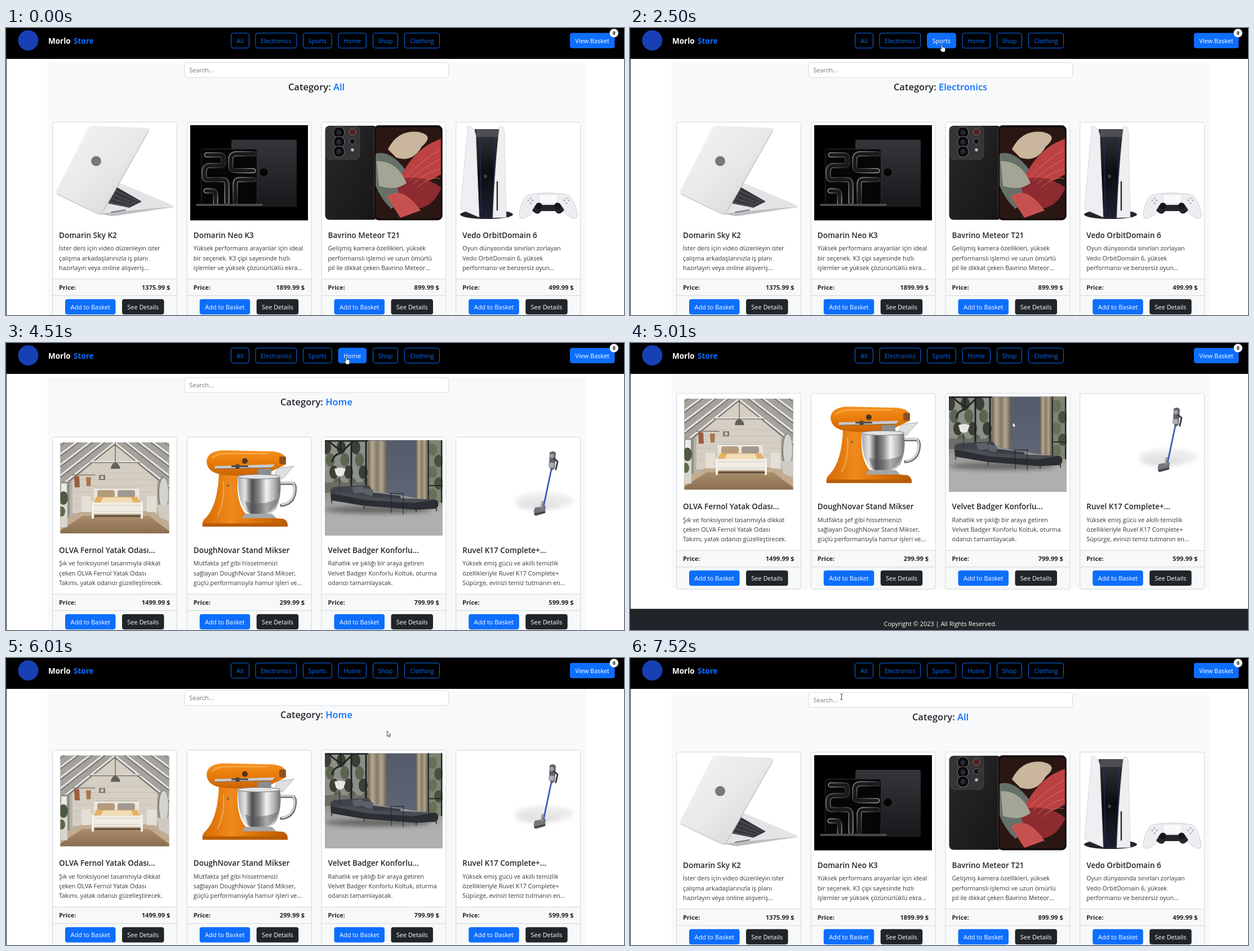
An HTML page that plays this animation: 1097 px wide and 511 px high, repeating every 8000 ms.

```html
<!DOCTYPE html>
<html lang="tr">
<head>
<meta charset="utf-8">
<title>Shop</title>
<style>
html, body { margin: 0; width: 100%; height: 100%; overflow: hidden; background: #fff; }
svg { display: block; width: 100%; height: 100%; }
text { font: 10.95px "Open Sans", "Noto Sans", sans-serif; fill: #212529; white-space: pre; }
.mid { text-anchor: middle; }
.end { text-anchor: end; }
.head { font-size: 16.5px; font-weight: 600; }
.name { font-size: 13.5px; font-weight: 600; }
.desc { font-size: 10.8px; fill: #33373b; }
.bold { font-weight: 700; }
.sum { font-size: 11.2px; font-weight: 700; }
.brand { font-size: 13.5px; font-weight: 700; }
.badge { font-size: 8.2px; font-weight: 700; }
</style>
</head>
<body>
<svg id="stage" viewBox="0 0 1097 511" preserveAspectRatio="none"></svg>
<script>
const BLUE = '#0d6efd', DARK = '#212529';

// Shape helpers
const rect = (x, y, w, h, fill, rx = 0, more = '') =>
  `<rect x="${x}" y="${y}" width="${w}" height="${h}" rx="${rx}" fill="${fill}" ${more}/>`;
const oval = (x, y, rx, ry, fill, more = '') =>
  `<ellipse cx="${x}" cy="${y}" rx="${rx}" ry="${ry}" fill="${fill}" ${more}/>`;
const dot = (x, y, r, fill, more) => oval(x, y, r, r, fill, more);
const path = (d, fill, more = '') => `<path d="${d}" fill="${fill}" ${more}/>`;
const line = (d, stroke, w = 1, more = '') =>
  `<path d="${d}" fill="none" stroke="${stroke}" stroke-width="${w}" stroke-linecap="round" stroke-linejoin="round" ${more}/>`;
const text = (x, y, s, cls = '', fill = '') =>
  `<text x="${x}" y="${y}" class="${cls}"${fill && ` style="fill:${fill}"`}>${s}</text>`;
const grad = (id, stops, x2 = 0, y2 = 1) =>
  `<linearGradient id="${id}" x2="${x2}" y2="${y2}">` + stops.map((c, i) =>
    `<stop offset="${i / (stops.length - 1)}" stop-color="${c}"/>`).join('') + '</linearGradient>';
const repeat = (n, f) => Array.from({ length: n }, (_, i) => f(i)).join('');
const blur = 'filter="url(#soft)"';

const defs = '<defs>' +
  grad('lid', ['#f4f4f4', '#e9e9ea', '#d0d1d3'], 1, 1) +
  grad('slate', ['#35353b', '#18181b']) +
  grad('tube', ['#9a9a9f', '#2c2c30', '#a2a2a7'], 1, 1) +
  grad('back', ['#2b2829', '#171516'], 1, 1) +
  grad('core', ['#34363d', '#0c0d12', '#1b2030']) +
  grad('street', ['#9a9ea3', '#73777c', '#5f656b', '#777c83']) +
  grad('knit', ['#10151f', '#12325f', '#1b5fae', '#15468c'], 1, 0) +
  grad('orange', ['#f59222', '#e87a08', '#c86203']) +
  grad('column', ['#d56a04', '#f08a1c', '#d87006', '#b95a02'], 1, 0) +
  grad('steel', ['#a9aaac', '#e4e4e4', '#4f4f52', '#8b8b8e', '#f2f2f2', '#b9babc', '#6d6e71'], 1, 0) +
  grad('wall', ['#565b6c', '#666b7c']) +
  grad('floor', ['#8d8c8a', '#b1b0ae', '#a3a2a0']) +
  grad('drape', ['#6f6654', '#b5aa94', '#837a67', '#b0a58f', '#6d6453'], 1, 0) +
  grad('rug', ['#a98c6b', '#8a6e50']) +
  '<filter id="soft" x="-30%" y="-50%" width="160%" height="200%"><feGaussianBlur stdDeviation="4"/></filter>' +
  '<clipPath id="screen"><rect x="656" y="177" width="116" height="162" rx="6"/></clipPath>' +
  '<clipPath id="road"><rect x="446.5" y="173" width="209" height="169.5"/></clipPath>' +
  '<clipPath id="lounge"><rect x="566" y="173" width="209" height="169.5"/></clipPath>' +
  '<clipPath id="attic"><rect x="96.5" y="177" width="193" height="162"/></clipPath>' +
  '</defs>';

// Product pictures, in page coordinates
const art = {
  lightLaptop: () =>
    path('M200 275L297 316V320L190 335L163 331Z', '#e3e4e5') +
    path('M297 318L190 335L166 331L190 328Z', '#bcbdc0') +
    path('M196 283L241 309L219 320L180 312Z', '#36373b') +
    repeat(4, i => line(`M${193 - i * 4} ${289 + i * 7}L${235 - i * 5} ${309 + i * 3}`, '#85868a', .6)) +
    path('M153 174L250 178Q256 179 253 185L172 328Q168 334 161 330L91 296Q87 293 90 288L146 178Q148 174 153 174Z', 'url(#lid)') +
    line('M253 184L171 329Q168 333 161 330L91 296', '#b8babc', 1.2) +
    line('M187 328L212 324', '#77787b', 1.8) +
    dot(160, 237, 9, '#77797c'),
  darkLaptop: () =>
    rect(327, 173, 209, 169.5, '#000') +
    rect(400, 199, 116, 119, 'url(#slate)', 4) +
    rect(346.5, 215.5, 99, 99, '#060607', 4, 'stroke="#303034"') +
    ['M356 226H380Q386 226 386 232V239Q386 245 380 245H362Q352 245 352 255V264Q352 270 358 270H385Q392 270 392 279V310',
      'M440 224H409Q399 224 399 234V248Q399 254 407 254H439', 'M440 270H414Q407 270 407 278V310',
      'M355 290H365Q372 290 372 297V311'].map(d => line(d, 'url(#tube)', 9) + line(d, '#1a1a1d', 6)).join('') +
    rect(337, 313, 119, 4, '#48484d', 2) + rect(456, 315, 60, 3, '#1f1f22', 1) +
    dot(457.5, 257, 7, '#050506'),
  phone: () =>
    rect(566.5, 174, 93, 167.5, 'url(#back)', 8) +
    rect(568, 175, 60, 59, '#363437', 7, 'stroke="#504c4e" stroke-width=".7"') +
    [186, 203, 220].map(y => dot(591, y, 10, '#0b0b0c', 'stroke="#777"') + dot(591, y, 4.5, '#262b38')).join('') +
    dot(615, 185, 6, '#50211f', 'stroke="#777"') + dot(615, 202, 5, '#111', 'stroke="#777"') + dot(615, 217, 2.8, '#c2bda9') +
    rect(653.5, 173.5, 121, 168.5, '#0b0808', 8, 'stroke="#48403d"') +
    '<g clip-path="url(#screen)">' + rect(656, 177, 116, 162, '#2a1714') +
    path('M656 224Q682 216 710 254Q721 298 684 322Q665 304 656 280Z', '#657069') +
    path('M678 216Q695 181 732 185Q762 191 738 211Q722 240 693 231Z', '#cab69c') +
    path('M774 197Q727 211 701 264Q720 292 775 259Z', '#bc4143') +
    path('M690 272Q738 256 773 285Q751 333 706 318Z', '#8c2b30') +
    path('M658 237Q694 236 711 276Q692 291 662 281Z', '#a4a596') +
    path('M676 300Q704 279 736 325L700 338Z', '#c65250') +
    repeat(4, i => line(`M${710 + i * 7} ${265 + i * 6}Q${730 + i * 8} ${242 + i * 7} 770 ${217 + i * 17}`, '#df8c7c', .7)) +
    '</g>' + dot(714, 181, 1.5, '#050505'),
  console: () =>
    oval(853, 332, 47, 8, '#23242a') +
    path('M832 180H878L873 336H837Z', 'url(#core)') +
    rect(835, 180, 41, 14, '#4c4e54') +
    line('M841 195L844 330M868 195L865 328', '#25365c', 1) +
    path('M820 174Q831 178 834 190L840 337L810 324Q806 322 807 317Z', '#eeeff1', 'stroke="#c8cacf" stroke-width=".7"') +
    path('M876 176L882 176Q886 182 885 208L888 337L864 338Q868 240 876 176Z', '#eeeff1', 'stroke="#c8cacf" stroke-width=".7"') +
    line('M872 274V324', '#2a2b30', 2.4) + dot(851, 264, 3, '#3b4051') +
    path('M927 297Q962 290 998 297Q1008 304 1014 330Q1015 341 1006 339Q995 334 988 325H937Q930 335 919 339Q910 341 911 329Q917 302 927 297Z', '#eceef1', 'stroke="#c1c4ca" stroke-width=".8"') +
    path('M940 315H985L991 324Q981 336 975 326H950Q944 336 934 325Z', '#24262c') +
    path('M944 296H981L977 313H948Z', '#f9f9fa', 'stroke="#ccced2" stroke-width=".7"') +
    dot(946, 317, 6, '#15161a') + dot(979, 317, 6, '#15161a') +
    [931, 995].map(x => [[-4, 0], [4, 0], [0, -4], [0, 5]].map(([a, b]) => dot(x + a, 307 + b, 1.8, '#b5b9c0')).join('')).join(''),
  whiteShoe: () =>
    rect(208, 173, 209, 169.5, '#f4f4f4') +
    oval(365, 244, 4, 9, 'none', 'stroke="#7a747d" stroke-width="1.3"') +
    path('M238 283Q260 276 282 252Q295 237 304 242Q314 254 330 249L348 246Q361 244 362 253Q364 264 375 276L386 292L325 299L238 297Z', '#fcfcfd', 'stroke="#d9dade" stroke-width=".7"') +
    path('M316 286Q340 269 373 271Q388 284 387 301Q354 306 316 302Z', '#393b44') +
    path('M236 286L318 294L325 301Q266 304 239 298Z', '#fff', 'stroke="#cfd1d5" stroke-width=".6"') +
    line('M239 299Q275 305 318 302', '#34363d', 1.4) + line('M331 291Q350 282 373 289', '#777a84', 2) +
    line('M323 277Q337 265 347 249M300 251L316 271', '#dec4e1', 1.8) +
    repeat(4, i => line(`M${286 + i * 6} ${261 - i * 3}l8 5`, '#d6d6df', 1)) + dot(272, 284, 4, '#303136'),
  streetShoe: () =>
    '<g clip-path="url(#road)">' + rect(446.5, 173, 209, 169.5, 'url(#street)') +
    `<g ${blur}>` + rect(440, 170, 100, 53, '#b3b5b6') + rect(540, 169, 52, 57, '#777777') +
    rect(445, 183, 34, 49, '#6f6766') + rect(486, 185, 28, 32, '#4f5961') + rect(526, 213, 65, 18, '#343d45') +
    rect(598, 167, 28, 76, '#34393e') + rect(628, 173, 35, 105, '#888a8b') + rect(580, 238, 64, 43, '#565c62') +
    dot(548, 194, 11, '#ac8751') + dot(564, 182, 9, '#9a7d54') +
    rect(440, 240, 220, 25, '#83878a') + rect(440, 305, 220, 16, '#8b9098') + '</g>' +
    oval(549, 291, 83, 5, '#333a43', blur) +
    path('M470 244Q473 224 484 227Q499 239 512 237Q525 228 535 226L570 249Q606 253 629 264Q636 274 626 283L488 288Q468 276 470 244Z', '#dedede') +
    path('M468 264Q495 282 540 278L633 271Q632 288 604 290L493 291Q470 285 468 264Z', '#f4f4f3') +
    line('M492 290L604 290Q624 288 631 280', '#555b62', 1.2) +
    line('M512 237Q521 250 550 263M535 227Q547 244 574 254', '#b2b4b6', 1.4) +
    repeat(4, i => line(`M${524 + i * 8} ${239 + i * 4}l8 -6`, '#f5f5f5', 1.4)) +
    dot(555, 265, 6, '#999da1') + '</g>',
  blueShoe: () =>
    path('M694 240Q703 230 716 235Q738 243 752 226Q761 214 774 219L805 238Q838 250 879 253Q893 261 889 272L702 284Q687 271 694 240Z', 'url(#knit)') +
    path('M692 270Q755 281 816 272L889 264Q889 282 861 289L720 294Q690 292 692 270Z', '#e5e8ea') +
    path('M724 276Q794 276 829 269L854 274Q804 290 737 288Z', '#3b9be0') +
    line('M691 289Q717 295 747 291M766 293L834 292Q874 290 888 278', '#e7752e', 2.2) +
    line('M718 239Q743 246 759 231', '#f1b17b', 1) +
    repeat(6, i => line(`M${767 + i * 9} ${231 + i * 3}l13 -6`, '#091729', 2)) +
    line('M704 253Q737 257 755 269M841 253Q862 257 878 267', '#2f75bd', 1) + dot(814, 260, 9, '#827c7a'),
  bedroom: () =>
    '<g clip-path="url(#attic)">' + rect(96, 177, 194, 162, '#b7b1a7') +
    path('M118 243L193 181L268 243V303H118Z', '#d5cec3') +
    repeat(6, i => line(`M119 ${232 + i * 11}H267`, '#c2bbb0', .7)) +
    path('M96 177H290V262L193 181L96 262Z', '#a5a29e') +
    // Nested rafters, nearer ones higher up
    repeat(5, i => ['#76736f', '#e3e1dd'].map((c, k) =>
      line(`M96 ${256 - i * 19 - k}L193 ${178 - i * 17 - k}L290 ${256 - i * 19 - k}`, c, 6 - k * 2.5)).join('')) +
    line('M150 212H237', '#8b857c', 4) + line('M150 211H237', '#e4e0d9', 2.4) +
    line('M194 177V214', '#3f3d3a', 1) + path('M186 224Q187 214 194 213Q201 214 203 224Z', '#63605c') +
    rect(96, 247, 17, 82, '#8f9188') + rect(98, 250, 10, 25, '#e9ebe6') +
    path('M96 339V318L136 299H260L290 321V339Z', '#c1ab90') + path('M96 339V334L136 308H254L290 335V339Z', 'url(#rug)') +
    rect(96, 279, 13, 49, '#d9d6ce') + oval(102, 276, 8, 12, '#4b5940') + oval(99, 300, 6, 9, '#5c6a4c') +
    rect(134, 273, 17, 28, '#e4dfd5', 1) + rect(250, 273, 17, 28, '#e4dfd5', 1) +
    rect(156, 257, 80, 32, '#ebe6dc', 2) + line('M158 258H234', '#a49c90', 1) +
    rect(162, 262, 31, 13, '#b49b7c', 4) + rect(198, 262, 31, 13, '#a19890', 4) +
    path('M160 274H233L241 291H153Z', '#e3b163') + path('M172 275H222L226 284H168Z', '#f0dcb7') +
    rect(152, 284, 91, 20, '#f1ede4', 2) + line('M154 289H241M154 300H241', '#c9c2b6', .8) +
    line('M154 284V311M241 284V311', '#f4f1ea', 4) + line('M158 308H238', '#5e4a37', 3) +
    rect(165, 235, 11, 9, '#8b7561') + rect(168, 237, 5, 5, '#d8cbb9') +
    path('M142 239h9l-1 16h-7Z', '#a8764f') + path('M121 237h9l1 20h-9Z', '#9a5e3d') + line('M118 235H158', '#80756a', 1.5) +
    oval(279, 268, 10, 30, '#8a8680') + oval(280, 268, 8, 28, '#d3d3d0') + path('M268 288h22v30l-18 -8Z', '#d0cbc2') + '</g>',
  mixer: () =>
    path('M378 232L412 234Q407 276 422 300Q427 307 440 309L492 313Q501 316 500 327H349Q347 317 355 311Q376 288 378 232Z', 'url(#column)') +
    path('M349 321H500V327H349Z', '#b85c06') +
    path('M356 211Q357 193 384 191L474 193Q495 195 497 207V216L470 229Q440 239 388 235Q357 232 356 211Z', 'url(#orange)') +
    path('M371 219L477 216L472 222L370 224Z', '#c9c9ca') + line('M371 224L472 222', '#6a6154', 1) +
    dot(411, 220, 4, '#45413d') + rect(400, 218, 30, 3, '#4c4945', 1) +
    rect(485, 202, 12, 14, '#8c5220', 3) + rect(447, 224, 24, 13, '#8b8d90', 3) +
    path('M482 223L511 219L491 242H474Z', '#dedfe0', 'stroke="#a0a2a4" stroke-width=".8"') +
    line('M485 250H508Q515 251 513 265Q510 287 489 289', '#6e7073', 5.5) + line('M486 249H508Q514 251 512 265Q509 285 490 288', '#dededf', 2.5) +
    path('M412 238H486Q491 270 479 295Q468 308 446 308Q423 305 416 280Q411 262 412 238Z', 'url(#steel)') +
    path('M424 282Q450 291 482 278Q474 307 446 308Q430 305 424 282Z', '#55565a', 'opacity=".45"') +
    oval(449, 238, 38, 4, '#e2e3e4', 'stroke="#77797c"') + path('M424 304H472L480 312H418Z', '#a5a6a9') +
    dot(424, 210, 5, '#50351c') + dot(394, 254, 2, '#74614b') +
    line('M366 205Q371 198 391 197H463M386 247Q389 281 376 307', '#ffc16a', 2, 'opacity=".65"'),
  sofa: () =>
    '<g clip-path="url(#lounge)">' + rect(566, 173, 209, 169.5, 'url(#wall)') +
    rect(566, 173, 76, 96, '#8c9088') +
    repeat(12, i => oval(569 + i * 6.5, 186 + i * 5 % 4 * 22, 8, 12, i % 2 ? '#5d6552' : '#3a4036')) +
    rect(566, 248, 76, 21, '#6b6d66') +
    line('M613 173V264M639 173V264M566 174H642', '#1e2124', 3) +
    rect(642, 174, 33, 92, 'url(#drape)') + rect(728, 173, 20, 109, 'url(#drape)') +
    rect(749, 173, 26, 112, '#7d8472') +
    repeat(5, i => oval(757 + i % 2 * 11, 190 + i * 20, 8, 11, i % 2 ? '#48503f' : '#687058')) +
    line('M750 173V282M773 173V286M750 254H775', '#25292d', 2) +
    path('M566 267L644 262L728 276L775 285V343H566Z', 'url(#floor)') +
    path('M566 302L655 294L775 309V343H566Z', '#b0afad') +
    oval(660, 297, 95, 6, '#5f5f5f', blur) +
    path('M576 267Q574 257 586 256L641 253Q648 254 649 264L649 274L578 276Z', '#40434a') +
    path('M649 266L700 272L702 281L649 278Z', '#3b3e45') +
    path('M576 269L606 266L648 274L762 279Q769 281 767 290L764 295L728 297L636 290L577 280Z', '#2b2e33') +
    path('M580 268L606 266L648 274L760 279L724 285L640 280Z', '#4a4d54') +
    path('M614 257l19 -2l5 11l-20 2ZM636 258l16 3l-2 12l-14 -4Z', '#5d6169') +
    line('M578 281V285M636 291V295M728 297V301M764 295V299', '#1b1d20', 1.4) +
    line('M680 268H707M684 268V302M705 268V305', '#1d1f23', 1) +
    line('M592 239V264', '#2f3230', 1.2) + path('M583 224Q592 220 603 224L599 235Q593 240 586 235Z', '#e8e7e3') +
    line('M572 173Q583 186 598 192L616 175M594 173V196Q581 199 579 211', '#23271f', 3) + '</g>',
  vacuum: () =>
    oval(955, 281, 52, 14, '#ebebeb', blur) + oval(945, 288, 38, 8, '#e2e2e2', blur) +
    line('M968 225L954 292', '#2950ad', 2.6) + line('M967 225L953 291', '#6b91dc', .8) +
    path('M965 195Q972 190 976 196L974 223L968 228L964 219Z', '#5f6267') +
    line('M972 205L979 211L976 225', '#3d3f44', 3) + dot(969, 201, 4, '#9a9ea5') + rect(963, 213, 10, 9, '#a9acb2', 2) +
    path('M939 293L958 290L957 303L940 308Q934 302 939 293Z', '#73767b') + line('M939 305L956 301', '#3e4147', 3) +
    line('M953 283L951 293', '#8f949c', 4)
};

const catalog = {
  All: [
    ['Domarin Sky K2', 'İster ders için video düzenleyin ister|çalışma arkadaşlarınızla iş planı|hazırlayın veya online alışveriş...', '1375.99', 'lightLaptop'],
    ['Domarin Neo K3', 'Yüksek performans arayanlar için ideal|bir seçenek. K3 çipi sayesinde hızlı|işlemler ve yüksek çözünürlüklü ekra...', '1899.99', 'darkLaptop'],
    ['Bavrino Meteor T21', 'Gelişmiş kamera özellikleri, yüksek|performanslı işlemci ve uzun ömürlü|pil ile dikkat çeken Bavrino Meteor...', '899.99', 'phone'],
    ['Vedo OrbitDomain 6', 'Oyun dünyasında sınırları zorlayan|Vedo OrbitDomain 6, yüksek|performansı ve benzersiz oyun...', '499.99', 'console']
  ],
  Sports: [
    ['Rovu Sky Fen 480', 'Spor ve şıklığı bir araya getiren Rovu|Sky Fen 480, rahat yapısı ve özel|tasarımı ile dikkat çekiyor.', '129.99', 'whiteShoe'],
    ['Ondaro Velostride', 'Koşu performansını artıran Ondaro|Velostride, şık tasarımı ve konforu ile|spor severlerin favorisi.', '169.99', 'streetShoe'],
    ['Tevro Lum-Cirrus 47', 'Yüksek performanslı koşu ayakkabısı|Tevro Lum-Cirrus 47, özel teknolojisi|ile ayak sağlığını ön planda tutar.', '159.99', 'blueShoe']
  ],
  Home: [
    ['OLVA Fernol Yatak Odası...', 'Şık ve fonksiyonel tasarımıyla dikkat|çeken OLVA Fernol Yatak Odası|Takımı, yatak odanızı güzelleştirecek.', '1499.99', 'bedroom'],
    ['DoughNovar Stand Mikser', 'Mutfakta şef gibi hissetmenizi|sağlayan DoughNovar Stand Mikser,|güçlü performansıyla hamur işleri ve...', '299.99', 'mixer'],
    ['Velvet Badger Konforlu...', 'Rahatlık ve şıklığı bir araya getiren|Velvet Badger Konforlu Koltuk, oturma|odanızı tamamlayacak.', '799.99', 'sofa'],
    ['Ruvel K17 Complete+...', 'Yüksek emiş gücü ve akıllı temizlik|özellikleriyle Ruvel K17 Complete+|Süpürge, evinizi temiz tutmanın en...', '599.99', 'vacuum']
  ]
};

const button = (x, y, w, label, fill) =>
  rect(x, y, w, 27.2, fill, 4) + text(x + w / 2, y + 18, label, 'mid', '#fff');

const card = ([name, desc, price, pic], x) =>
  rect(x, 167.5, 221, 348.5, '#fff', 4) +
  rect(x, 447, 221, 69, '#f7f8f8', 3) +
  line(`M${x} 447H${x + 221}M${x} 476.5H${x + 221}`, '#d3d5d7') +
  rect(x, 167.5, 221, 348.5, 'none', 4, 'stroke="#d3d5d7"') +
  art[pic]() +
  text(x + 11.5, 374, name, 'name') +
  desc.split('|').map((s, i) => text(x + 11.5, 396.3 + i * 17.4, s, 'desc')).join('') +
  text(x + 11.5, 466, 'Price:', 'bold') + text(x + 209, 466, price + ' $', 'sum end') +
  button(x + 22.5, 482.8, 89.5, 'Add to Basket', BLUE) +
  button(x + 123.5, 482.8, 74.5, 'See Details', DARK);

const grid = key => {
  const list = catalog[key], left = 82.5 + (4 - list.length) * 119.4;
  return `<g id="grid${key}">` + list.map((p, i) => card(p, left + i * 238.75)).join('') + '</g>';
};

const tabs = [['All', 399.5, 32], ['Electronics', 443, 72.7], ['Sports', 527.5, 50.8],
  ['Home', 590, 49.5], ['Shop', 651.5, 44], ['Clothing', 707.5, 62]];

const cursors = {
  hand: path('M3 1.3Q3 0 4.1 0Q5.2 0 5.2 1.3V5Q6.5 4.3 7.2 5.3Q8.3 4.9 8.9 6Q10.2 5.9 10.2 7.4V10Q10.2 11.3 9.2 13.5H4L.8 9.2Q0 8 .8 7.6Q1.7 7.2 3 8.7Z', '#fff', 'stroke="#111" stroke-width=".8"'),
  arrow: path('M0 0V9.6L2.2 7.6L3.8 11L5.4 10.3L3.9 7H6.8Z', '#fff', 'stroke="#222" stroke-width=".8"'),
  beam: line('M-2 -5H-.7L0 -4.5L.7 -5H2M0 -4.5V4.5M-2 5H-.7L0 4.5L.7 5H2', '#222', .9)
};

const stage = document.getElementById('stage');
stage.innerHTML = defs + rect(0, 0, 1097, 511, '#fff') +
  '<g id="page">' + rect(74, 61, 954.5, 455, '#f8f9fa') +
  rect(317, 61.5, 468.5, 26.5, '#fff', 4, 'stroke="#d9dee3"') + text(325.5, 79, 'Search...', '', '#71777c') +
  `<text x="551" y="111" class="head mid">Category: <tspan id="label" fill="${BLUE}"></tspan></text>` +
  Object.keys(catalog).map(grid).join('') +
  rect(0, 551, 1097, 80, DARK) + text(550.7, 581.6, 'Copyright © 2023 | All Rights Reserved.', 'mid', '#fff') +
  '</g>' +
  rect(0, 0, 1097, 55, '#000') + dot(39.5, 22, 18, '#1740b5') +
  text(75, 28, 'Morlo', 'brand', '#fff') + text(120, 28, 'Store', 'brand', BLUE) +
  tabs.map(([s, x, w]) => `<g id="tab${s}">` + rect(x, 9, w, 26.7, 'none', 4, `stroke="${BLUE}"`) +
    text(x + w / 2, 26.8, s, 'mid', BLUE) + '</g>').join('') +
  button(1001, 8.8, 79.5, 'View Basket', BLUE) +
  rect(1071.5, 1.5, 15.5, 15, '#fff', 7.5) + text(1079.3, 12, '0', 'badge mid', '#000') +
  rect(0, 0, 1, 511, '#1c1c1c') +
  Object.entries(cursors).map(([k, s]) => `<g id="${k}">${s}</g>`).join('');

// start, category, hovered tab, scroll, cursor, x, y
const steps = [
  [0, 'All', '', 0, ''],
  [990, 'All', '', 0, 'beam', 553, 88],
  [1490, 'All', 'Electronics', 0, 'hand', 470, 26.5],
  [1990, 'Electronics', 'Electronics', 0, 'hand', 472, 28],
  [2500, 'Electronics', 'Sports', 0, 'hand', 549.5, 29.3],
  [3000, 'Sports', 'Sports', 0, 'hand', 549.5, 29.3],
  [3500, 'Sports', 'Sports', 0, 'hand', 550.7, 29.3],
  [4010, 'Sports', 'Home', 0, 'hand', 598.5, 23],
  [4510, 'Home', 'Home', 0, 'hand', 600, 24.5],
  [5010, 'Home', '', 77.7, 'arrow', 679, 141],
  [5520, 'Home', '', 78.5, 'arrow', 679, 141],
  [6010, 'Home', '', 3.6, 'arrow', 676.3, 130],
  [6520, 'Home', '', 0, 'arrow', 433, 41],
  [7020, 'All', 'All', 0, 'hand', 422, 24],
  [7520, 'All', '', 0, 'beam', 375.5, 69]
];

const el = id => document.getElementById(id);
const show = (id, on) => el(id).setAttribute('display', on ? 'inline' : 'none');

function draw(t) {
  const [, category, hover, scroll, cursor, x, y] = steps.findLast(s => s[0] <= t);
  el('page').setAttribute('transform', `translate(0 ${-scroll})`);
  el('label').textContent = category;
  const shown = catalog[category] ? category : 'All';
  for (const key in catalog) show('grid' + key, key === shown);
  for (const [s] of tabs) {
    const [box, label] = el('tab' + s).children;
    box.setAttribute('fill', s === hover ? BLUE : 'none');
    label.style.fill = s === hover ? '#fff' : BLUE;
  }
  for (const key in cursors) show(key, key === cursor);
  if (cursor) el(cursor).setAttribute('transform', `translate(${x} ${y})`);
}

const begin = performance.now();
function tick() {
  draw((performance.now() - begin) % 8000);
  requestAnimationFrame(tick);
}
tick();
</script>
</body>
</html>
```
